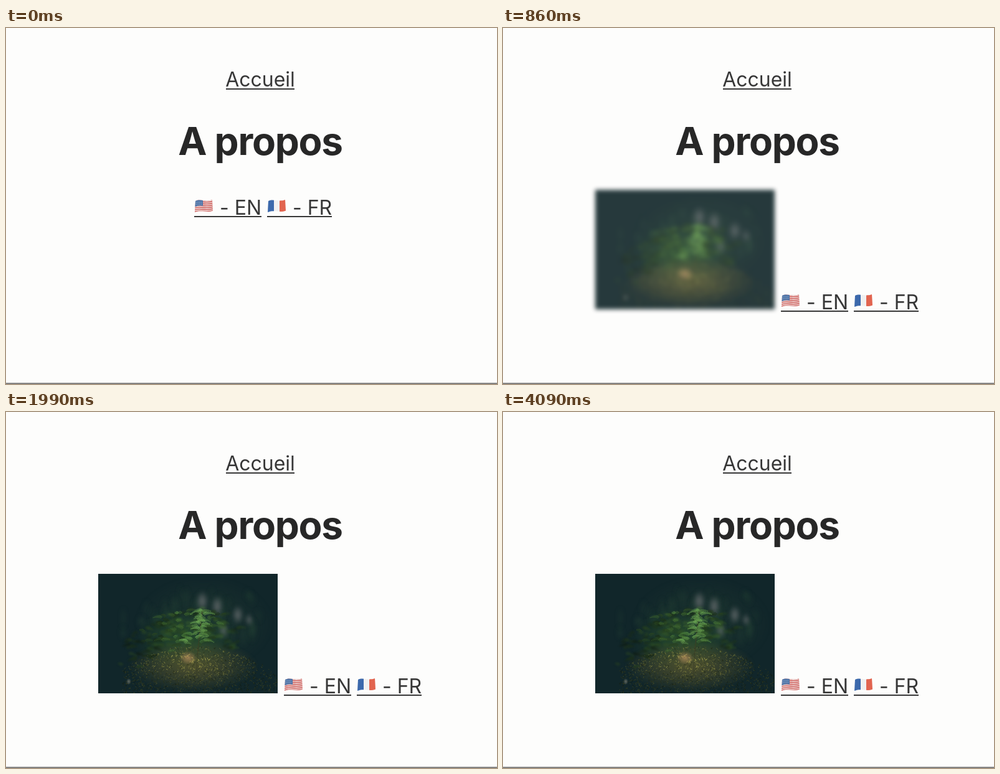
An HTML page with a canvas that plays this animation: 788x572 px, repeating every 4110 ms.

```html
<!DOCTYPE html>
<html lang="fr">
<head>
<meta charset="utf-8">
<title>A propos</title>
<style>
  html, body { margin: 0; width: 100%; height: 100%; overflow: hidden; background: #fdfdfc; }
  svg, canvas { position: absolute; left: 0; top: 0; }
  #photo { left: 148px; top: 260px; }
  text { font: 32px Inter, sans-serif; fill: #373737; }
  .title { font-size: 62px; font-weight: 700; fill: #272727; letter-spacing: -0.02em; text-anchor: middle; }
  .line { fill: #373737; }
</style>
</head>
<body>
<canvas id="photo" width="288" height="192"></canvas>
<svg width="788" height="572">
  <defs>
    <path id="wave" d="M2 3C10 -1 18 5 29 1L30 18.5C20 22.5 12 16.5 1 21Z"/>
    <clipPath id="cloth"><use href="#wave"/></clipPath>
  </defs>
  <text x="408" y="94" text-anchor="middle">Accueil</text>
  <rect class="line" x="353" y="97" width="110" height="2"/>
  <text class="title" x="408" y="204">A propos</text>
  <g id="links">
    <g transform="translate(302 275)">
      <g clip-path="url(#cloth)">
        <rect width="31" height="23" fill="#f1e6e4"/>
        <g id="stripes" fill="none" stroke="#cf5f5c" stroke-width="1.6"></g>
        <path d="M0 0H14V11Q8 9 0 13Z" fill="#4f75a8"/>
        <path d="M3 5H13M3 8H13" stroke="#c5d3e2" stroke-dasharray="1 1.6"/>
      </g>
    </g>
    <text x="343" y="300">- EN</text>
    <rect class="line" x="302" y="302" width="108" height="2"/>
    <g transform="translate(419 275)">
      <g clip-path="url(#cloth)">
        <rect width="31" height="23" fill="#f0f0f0"/>
        <rect width="11" height="23" fill="#3c69ac"/>
        <rect x="20" width="11" height="23" fill="#e2644f"/>
      </g>
    </g>
    <text x="460" y="300">- FR</text>
    <rect class="line" x="419" y="302" width="104" height="2"/>
  </g>
  <rect y="570" width="788" height="2" fill="#858585"/>
</svg>
<script>
const LOOP = 4110, APPEAR = 20, FADE = 2800, MAX_BLUR = 28;
const photo = document.getElementById('photo');
const links = document.getElementById('links');
const ctx = photo.getContext('2d');

let seed = 7;
const random = () => (seed = seed * 16807 % 2147483647) / 2147483647;
const between = (a, b) => a + (b - a) * random();
const bell = (a, b) => (between(a, b) + between(a, b)) / 2;

document.getElementById('stripes').innerHTML = Array.from({ length: 7 }, (_, i) =>
  `<path d="M0 ${2.5 + i * 3}C10 ${i * 3 - 2} 18 ${5 + i * 3} 31 ${i * 3}"/>`).join('');

function glow(x, y, rx, ry, rgb, alpha) {
  ctx.save();
  ctx.translate(x, y);
  ctx.scale(rx, ry);
  const g = ctx.createRadialGradient(0, 0, 0, 0, 0, 1);
  g.addColorStop(0, `rgba(${rgb},${alpha})`);
  g.addColorStop(0.5, `rgba(${rgb},${alpha * 0.55})`);
  g.addColorStop(1, `rgba(${rgb},0)`);
  ctx.fillStyle = g;
  ctx.fillRect(-1, -1, 2, 2);
  ctx.restore();
}

// A drooping twig with short needles on both sides
function twig(x, y, side, length, color) {
  ctx.strokeStyle = color;
  ctx.beginPath();
  const rise = between(-0.45, 0.1);
  for (let d = 0; d < length; d += 1.8) {
    const needle = 3 * (1 - d / length) + 1.2;
    const px = x + side * d;
    const py = y + rise * d + d * d / 45;
    for (const up of [-1, 1]) {
      ctx.moveTo(px, py);
      ctx.lineTo(px + side * needle * 0.8, py + up * needle * 0.6);
    }
  }
  ctx.stroke();
}

// Upper edge of the greenery
const moundTop = x => 56 + ((x - 165) / 12.5) ** 2 * (x < 165 ? 0.6 : 1.1);

function foliage(count, left, right, depth, light) {
  for (let i = 0; i < count; i++) {
    const x = bell(left, right), y = moundTop(x) + between(-2, depth);
    const near = Math.exp(-(((x - 160) / 60) ** 2));
    const v = light * between(0.35, 1) * (0.55 + 0.45 * near);
    twig(x, y, random() < 0.5 ? -1 : 1, between(6, 16), `rgba(${105 * v},${172 * v},${80 * v},.75)`);
  }
}

function moss() {
  for (let i = 0; i < 2200; i++) {
    const x = between(40, 288), y = between(112, 192);
    if (y < 116 + ((x - 155) / 15) ** 2 * 0.6) continue;
    const lit = Math.exp(-(((x - 150) / 78) ** 2) - ((y - 140) / 27) ** 2);
    const v = between(0.15, 1) ** 1.4 * (0.38 + lit);
    ctx.strokeStyle = `rgba(${160 * v + 10},${146 * v + 20},${66 * v + 12},.65)`;
    ctx.beginPath();
    ctx.moveTo(x, y);
    ctx.lineTo(x + between(-3, 3), y + between(-3, 3));
    ctx.stroke();
  }
}

function drawPhoto() {
  ctx.fillStyle = '#11262a';
  ctx.fillRect(0, 0, 288, 192);

  ctx.filter = 'blur(3px)';
  glow(170, 80, 110, 75, '40,66,54', 0.5);
  for (let i = 0; i < 40; i++) {
    glow(between(40, 265), between(25, 100), between(4, 9), between(10, 22), '40,72,54', between(0.1, 0.5));
  }
  for (const [x, y, r] of [[167, 44, 10], [191, 52, 10], [224, 66, 9], [201, 91, 8], [242, 74, 6]]) {
    glow(x, y, r, r * 1.7, '112,116,118', 0.8);
  }

  ctx.filter = 'blur(1.5px)';
  glow(140, 108, 85, 52, '48,92,46', 0.6);
  glow(152, 148, 105, 42, '104,96,48', 0.7);
  foliage(130, 30, 240, 50, 0.75);

  ctx.filter = 'none';
  moss();
  foliage(65, 55, 215, 58, 0.9);
  glow(144, 135, 14, 11, '208,156,104', 0.6);
  glow(49, 173, 4, 5, '130,130,118', 0.7);

  // Young spruce standing in the light
  ctx.strokeStyle = '#3c4026';
  ctx.beginPath();
  ctx.moveTo(157, 170);
  ctx.quadraticCurveTo(160, 110, 167, 60);
  ctx.stroke();
  for (let i = 0; i < 26; i++) {
    const drop = i / 26, v = between(0.75, 1.1);
    twig(167 - 7 * drop + bell(-32, 32) * drop, 58 + 54 * drop, i % 2 ? 1 : -1, between(9, 19),
      `rgba(${112 * v},${172 * v},${86 * v},.8)`);
  }
}

function frame(now) {
  const t = now % LOOP - APPEAR;
  const shown = t >= 0;
  const rest = 2 ** (-10 * Math.max(t, 0) / FADE);
  const blur = MAX_BLUR * rest;
  photo.style.visibility = shown ? 'visible' : 'hidden';
  photo.style.opacity = 1 - rest ** 1.15;
  photo.style.filter = blur > 0.15 ? `blur(${blur}px)` : 'none';
  links.setAttribute('transform', shown ? 'translate(144 152)' : '');
  requestAnimationFrame(frame);
}

drawPhoto();
frame(0);
</script>
</body>
</html>
```
